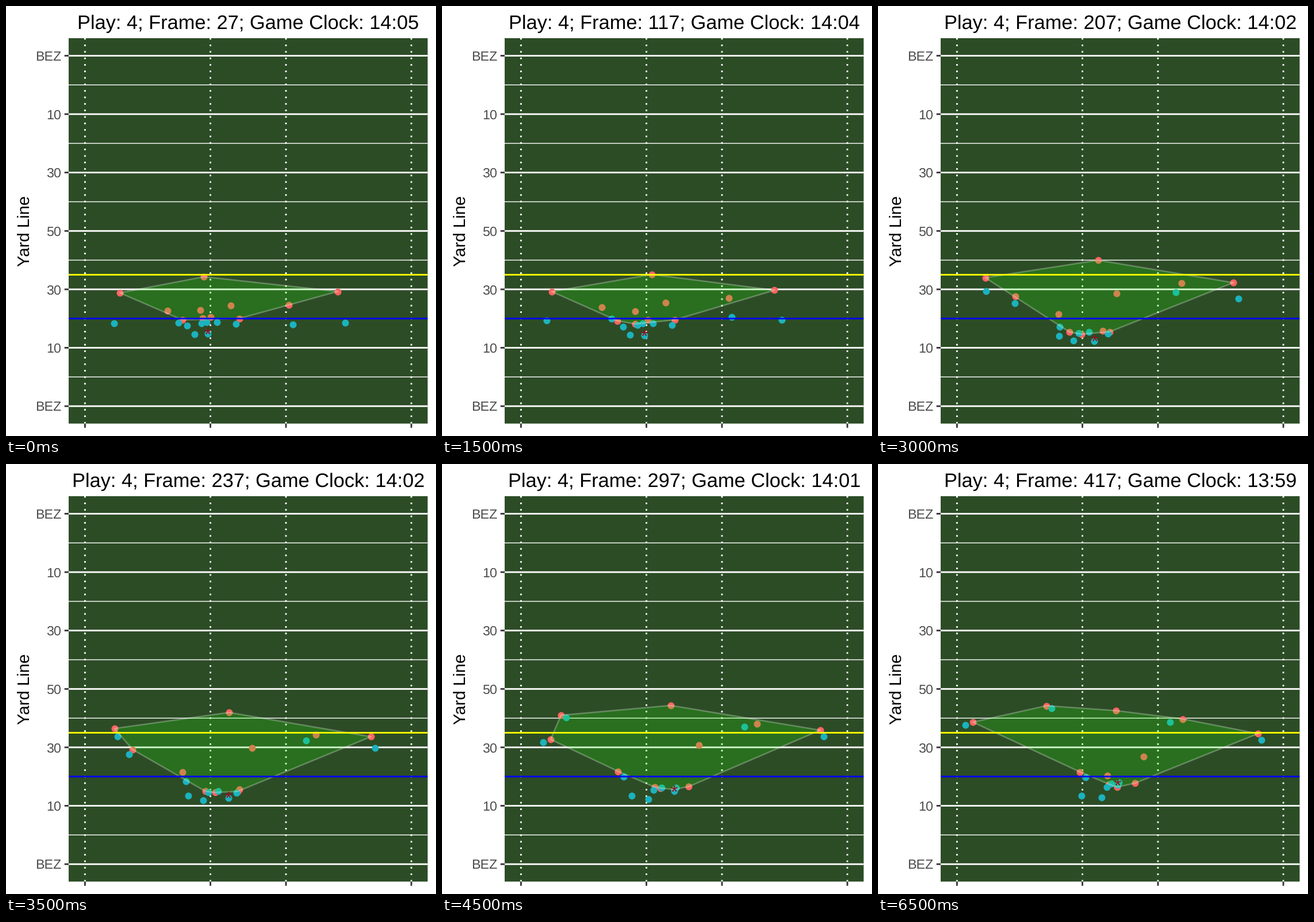
Recreate the animation shown at these times as a matplotlib script. Size 748 by 748 pixels, loop 7000 ms.

```python
import numpy as np
import matplotlib.pyplot as plt
from matplotlib.animation import FuncAnimation

SIZE, DPI = 748, 100
PX = 72 / DPI                       # points per pixel
FRAMES, STEP = 14, 500
LEFT, RIGHT, TOP, BOTTOM = 109, 733.5, 56, 726.4
MID, YARDS20 = 391.3, 101.6

plt.rcParams["font.family"] = "Liberation Sans"
plt.rcParams["text.hinting"] = "none"

# Each path runs through four points: start, snap, break and finish
START, SNAP, BREAK, FINISH = KEYS = np.array([0, 3, 9, 13])

ROUTES = np.array([
    [(188, 552), (182, 547), (216, 441), (302, 424.5)],
    [(300, 551), (295, 544), (176, 484), (152, 454)],
    [(328, 571), (327, 571.5), (316, 543.5), (361, 544.5)],
    [(499, 554), (504, 540.5), (526, 457), (508.5, 448.5)],
    [(590, 550.5), (591, 546), (664, 474), (667, 480)],
])
# Gap of each marking defender to his receiver: at the snap, when closed
GAPS = np.array([
    [(10, -53), (-9, -4)],
    [(-19, -21), (13, -5)],
    [(10, -42), (-10, -9)],
    [(-7, -34), (22, -5)],
    [(-13, -54), (-6, -11)],
])
DEEP = np.array([
    [(344.5, 471), (365, 467), (398, 420), (414, 429)],
    [(391, 520.5), (389, 516), (447, 489), (462, 508.5)],
])
RUSH = np.array([
    [(307, 546), (305, 547.5), (370, 562), (399, 541.5)],
    [(342, 543), (336, 553), (380, 564), (402, 557)],
    [(356, 541), (358, 545.5), (429.5, 561), (447.5, 555)],
    [(406, 543.5), (405, 546), (404, 566), (416, 562)],
])
PASSER = np.array([[(351, 570), (352, 573), (404, 569), (417, 558)]])
LINE_X = np.array([315, 340, 349, 367, 400])


def ease(t, a, b):
    u = np.clip((t - a) / (b - a), 0, 1)
    return u * u * (3 - 2 * u)


def follow(paths, t):
    """Positions at step t on smooth curves through the key points."""
    k = min(np.searchsorted(KEYS, t, side="right") - 1, len(KEYS) - 2)
    span = KEYS[k + 1] - KEYS[k]
    u = (t - KEYS[k]) / span
    slope = np.gradient(paths, KEYS, axis=1) * span
    return ((2 * u**3 - 3 * u**2 + 1) * paths[:, k]
            + (u**3 - 2 * u**2 + u) * slope[:, k]
            + (3 * u**2 - 2 * u**3) * paths[:, k + 1]
            + (u**3 - u**2) * slope[:, k + 1])


def push(t):
    """Backward surge of the pocket between snap and break."""
    u = np.clip((t - SNAP) / (BREAK - SNAP), 0, 1)
    return np.array([0, 10 * np.sin(np.pi * u)])


def blockers(t):
    """The line falls back, then slides right; the left guard sinks deepest."""
    k = np.arange(5)
    slide = (50 - 5 * (k - 1.5) ** 2) * ease(t, 6, FINISH)
    sink = (19 + 14 * np.exp(-2 * (k - 1) ** 2)) * ease(t, 2, 7)
    rise = 4.5 * k * ease(t, 7, 11)
    y = 550 + (k - 2.4) ** 2 + sink - rise
    return np.column_stack([LINE_X + slide, y])


def teams(t):
    runners = follow(ROUTES, t)
    closed = ease(t, 2, BREAK)
    markers = runners + GAPS[:, 0] * (1 - closed) + GAPS[:, 1] * closed
    rushers = follow(RUSH, t) + push(t)
    passer = follow(PASSER, t) + push(t)
    return (np.vstack([markers, follow(DEEP, t), rushers]),
            np.vstack([runners, blockers(t), passer]))


def hull(points):
    pts = sorted(map(tuple, points))

    def half(seq):
        out = []
        for p in seq:
            while len(out) > 1 and ((out[-1][0] - out[-2][0]) * (p[1] - out[-2][1])
                                    <= (out[-1][1] - out[-2][1]) * (p[0] - out[-2][0])):
                out.pop()
            out.append(p)
        return out[:-1]

    return half(pts) + half(pts[::-1])


fig = plt.figure(figsize=(SIZE / DPI, SIZE / DPI), dpi=DPI, facecolor="white")
ax = fig.add_axes([0, 0, 1, 1])
ax.set(xlim=(0, SIZE), ylim=(SIZE, 0))
ax.axis("off")


def line(x, y, color, width=2.83, z=1, **kw):
    ax.plot(x, y, color=color, lw=width * PX, zorder=z, snap=False,
            solid_capstyle="butt", dash_capstyle="butt", **kw)


def label(x, y, text, size, color="black", ha="center", **kw):
    return ax.text(x, y, text, fontsize=size * PX, color=color, ha=ha,
                   va="baseline", **kw)


def dots(color):
    return ax.plot([], [], "o", color=color, ms=12 * PX, mew=0,
                   zorder=3, snap=False)[0]


# Field
ax.add_patch(plt.Rectangle((LEFT, TOP), RIGHT - LEFT, BOTTOM - TOP,
                           fc="#2C4C26", lw=0, zorder=0, snap=False))
for n, name in enumerate(["BEZ", "10", "30", "50", "30", "10", "BEZ"]):
    y = MID + (n - 3) * YARDS20
    line([LEFT, RIGHT], [y, y], "white")
    line([LEFT - 7.3, LEFT], [y, y], "#333333")
    label(96, y + 8.4, name, 23.3, "#4D4D4D", "right")
    if n < 6:
        half_y = y + YARDS20 / 2
        line([LEFT, RIGHT], [half_y, half_y], "white", 1.42)
for x in (137.4, 355.6, 487, 705.1):
    line([x, x], [BOTTOM, TOP], "white", ls=(0, (1, 3)))
    line([x, x], [BOTTOM, BOTTOM + 7.3], "#333333")
line([LEFT, RIGHT], [MID + 0.75 * YARDS20] * 2, "#FFFF00", z=6)
line([LEFT, RIGHT], [MID + 1.5 * YARDS20] * 2, "#0000FF", z=6)
label(40.5, MID, "Yard Line", 29.2, rotation=90, rotation_mode="anchor")

# Moving parts
red, blue = dots("#FA6560"), dots("#1CB2BE")
zone = plt.Polygon([(0, 0)] * 3, fc=(0.12, 1, 0.02, 0.2), ec=(1, 1, 1, 0.27),
                   lw=2.6 * PX, joinstyle="round", zorder=4)
ax.add_patch(zone)
ball = label(0, 0, "*", 32, "#96101E", zorder=5)
title = label((LEFT + RIGHT) / 2, 39.8, "", 34.4)


def draw(i):
    defense, offense = teams(i)
    red.set_data(*defense.T)
    blue.set_data(*offense.T)
    zone.set_xy(hull(defense))
    x, y = offense[-1]
    ball.set_position((x, y + 11.4))
    clock = 14 * 60 + 5 - i // 2
    title.set_text(f"Play: 4; Frame: {27 + 30 * i}; "
                   f"Game Clock: {clock // 60}:{clock % 60:02d}")
    return red, blue, zone, ball, title


anim = FuncAnimation(fig, draw, frames=FRAMES, interval=STEP,
                     repeat=True, repeat_delay=0, blit=False)
plt.show()
```
